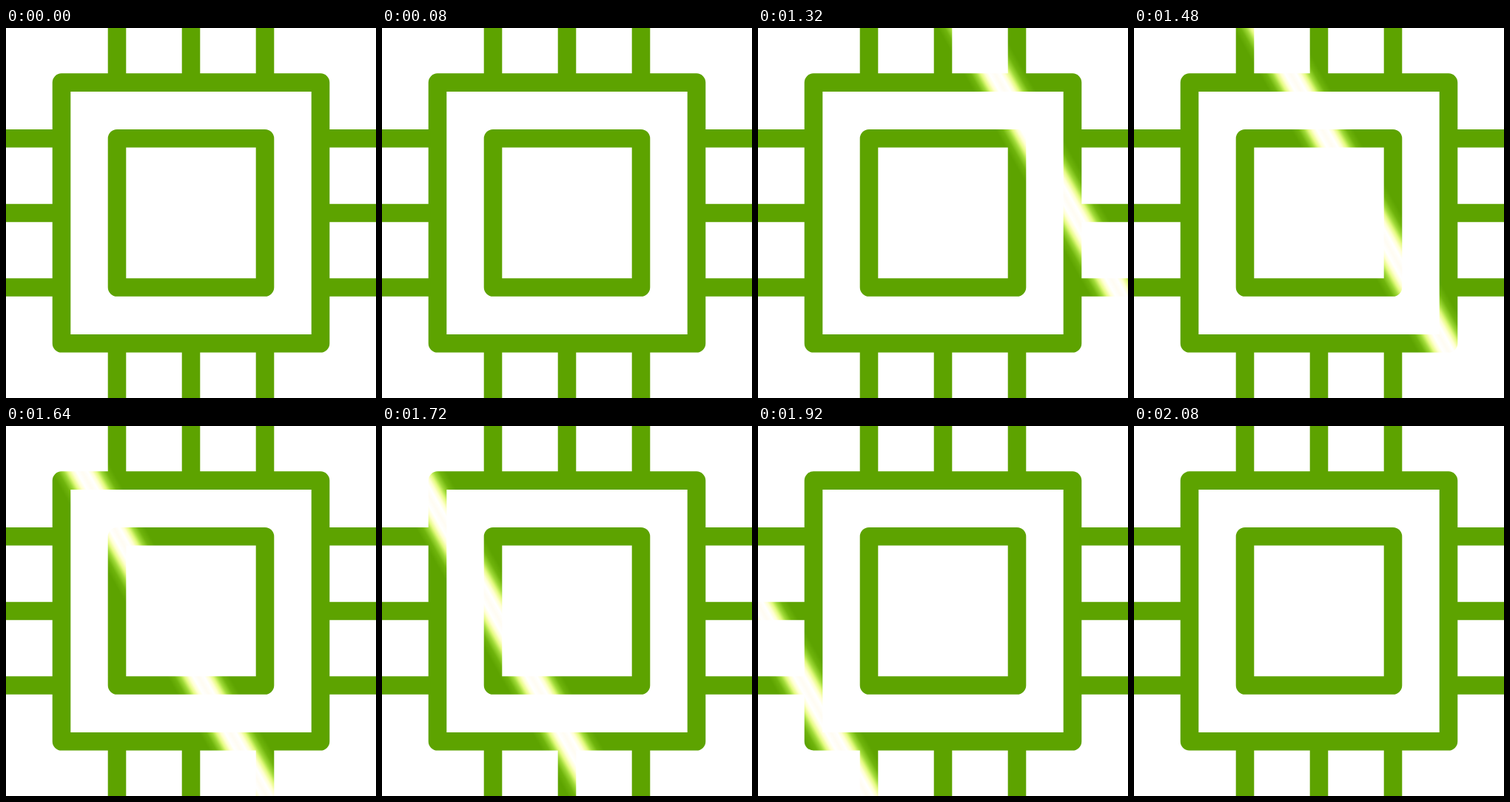
Recreate the animation shown at these times as an HTML page. Size 500x500 px, loop 4.12 s.

```html
<!DOCTYPE html>
<html lang="en">
<head>
<meta charset="utf-8">
<title>Chip with a passing glint</title>
<style>
  html, body {
    margin: 0;
    width: 100%;
    height: 100%;
    overflow: hidden;
    background: #fff;
  }
  svg {
    display: block;
    width: 100%;
    height: 100%;
  }
  .glint {
    animation: sweep 4120ms infinite;
  }
  /* Moves once every 40 ms; hidden off stage outside the sweep. */
  @keyframes sweep {
    0%     { transform: translate(900px, 250px); animation-timing-function: step-end; }
    27.18% { transform: translate(566px, 250px); animation-timing-function: steps(5); }
    32.03% { transform: translate(427px, 250px); animation-timing-function: steps(8); }
    39.80% { transform: translate(210px, 250px); animation-timing-function: steps(11); }
    50.48% { transform: translate(-111px, 250px); animation-timing-function: step-end; }
    50.49%, 100% { transform: translate(-500px, 250px); }
  }
</style>
</head>
<body>
<svg viewBox="0 0 500 500">
  <defs>
    <linearGradient id="shine">
      <stop offset="0" stop-color="#5da300"/>
      <stop offset=".11" stop-color="#6fb40c"/>
      <stop offset=".2" stop-color="#a0da38"/>
      <stop offset=".27" stop-color="#e4fa80"/>
      <stop offset=".34" stop-color="#ffffd0"/>
      <stop offset=".41" stop-color="#fff"/>
      <stop offset=".5" stop-color="#fffcf2"/>
      <stop offset=".59" stop-color="#fff"/>
      <stop offset=".66" stop-color="#ffffd0"/>
      <stop offset=".73" stop-color="#e4fa80"/>
      <stop offset=".8" stop-color="#a0da38"/>
      <stop offset=".89" stop-color="#6fb40c"/>
      <stop offset="1" stop-color="#5da300"/>
    </linearGradient>
    <mask id="chip" maskUnits="userSpaceOnUse" x="0" y="0" width="500" height="500">
      <g fill="none" stroke="#fff" stroke-width="24.6" stroke-linejoin="round">
        <path d="M75 73.6H425V426.2H75Z"/>
        <path d="M150 149.2H350V350.5H150Z"/>
        <path d="M150 0V73M250 0V73M350 0V73M150 427V500M250 427V500M350 427V500"/>
        <path d="M0 149.2H75M0 250H75M0 350.5H75M425 149.2H500M425 250H500M425 350.5H500"/>
      </g>
    </mask>
  </defs>
  <g mask="url(#chip)">
    <rect width="500" height="500" fill="#5da300"/>
    <g class="glint">
      <rect x="-42" y="-260" width="84" height="520" fill="url(#shine)" transform="skewX(29.6)"/>
    </g>
  </g>
</svg>
</body>
</html>
```
